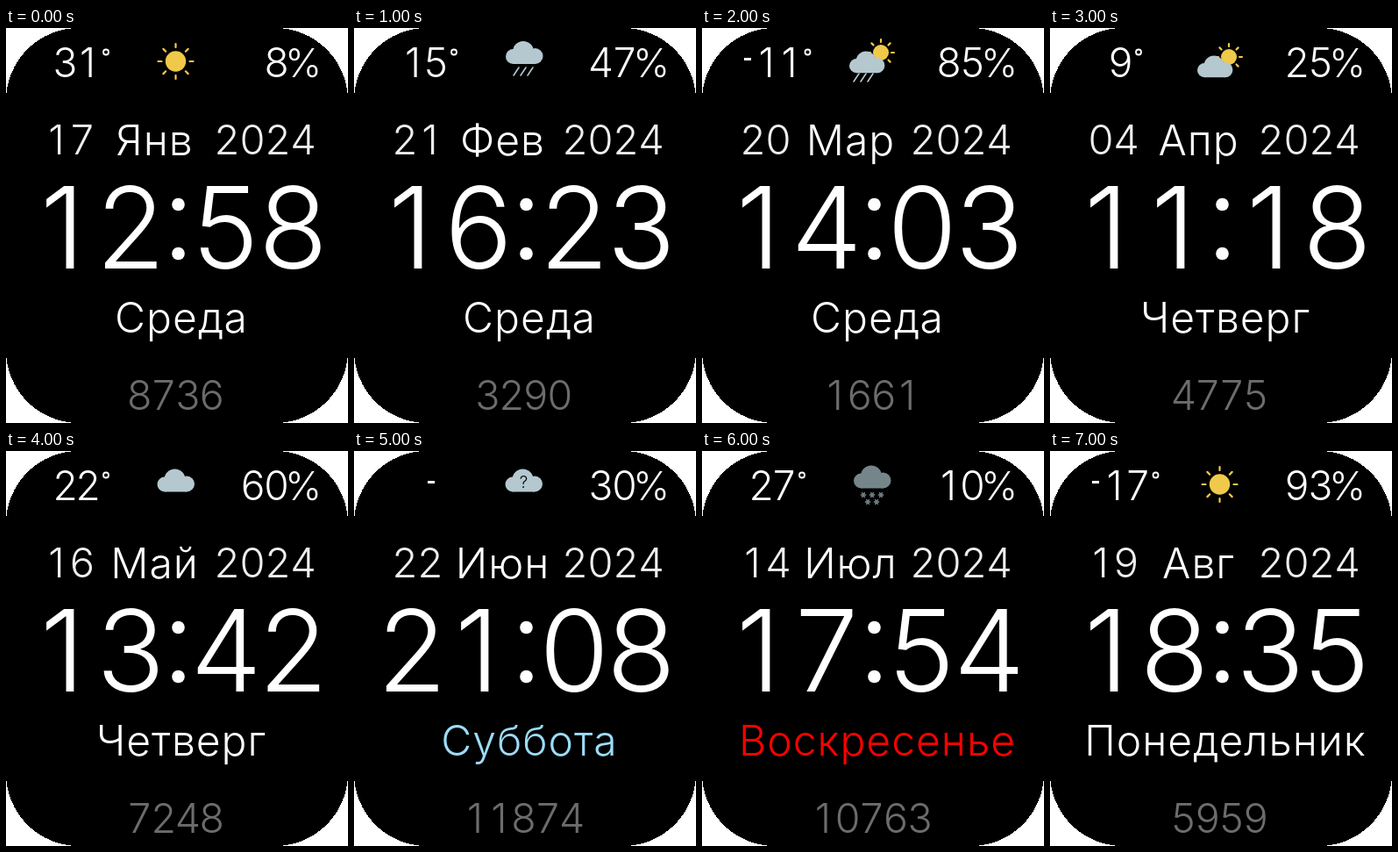
Recreate the animation shown at these times as an HTML page. Size 390x450 px, loop 8000 ms.

```html
<!DOCTYPE html>
<html lang="ru">
<meta charset="utf-8">
<title>Watch face</title>
<style>
  html, body { margin: 0; width: 100%; height: 100%; overflow: hidden; background: #fff }
  svg { display: block }
  text { font-family: Inter, "Liberation Sans", sans-serif; font-weight: 300; text-anchor: middle }
  .word { letter-spacing: 1px }
</style>
<svg width="390" height="450" viewBox="0 0 390 450">
  <rect width="390" height="450" rx="83" shape-rendering="crispEdges"/>
  <g id="face"></g>
</svg>
<script>
const SUN = '#f0c94a', LIGHT = '#b5c8cf', DARK = '#75868b', DATE = '#eee';

// temperature, icon, battery, day, month, time, weekday, steps
const states = [
  ['31', 'sun', 8, '17', 'Янв', '12:58', 'Среда', 8736],
  ['15', 'rain', 47, '21', 'Фев', '16:23', 'Среда', 3290],
  ['-11', 'sunRain', 85, '20', 'Мар', '14:03', 'Среда', 1661],
  ['9', 'sunCloud', 25, '04', 'Апр', '11:18', 'Четверг', 4775],
  ['22', 'cloud', 60, '16', 'Май', '13:42', 'Четверг', 7248],
  ['-', 'unknown', 30, '22', 'Июн', '21:08', 'Суббота', 11874],
  ['27', 'snow', 10, '14', 'Июл', '17:54', 'Воскресенье', 10763],
  ['-17', 'sun', 93, '19', 'Авг', '18:35', 'Понедельник', 5959]
];
const dayColors = { Суббота: '#9cdcf8', Воскресенье: '#f00' };

const text = (s, x, y, size, fill = '#fff', cls = '') =>
  `<text class="${cls}" x="${x}" y="${y}" font-size="${size}" fill="${fill}">${s}</text>`;
// Fixed-pitch digits; x is the centre of the first cell. The narrow 1 sits slightly left.
const digits = (s, x, y, size, pitch, fill) =>
  [...String(s)].map((c, i) => text(c, x + i * pitch - (c === '1') * size * .012, y, size, fill)).join('');
const circle = (x, y, r, fill) => `<circle cx="${x}" cy="${y}" r="${r}" fill="${fill}"/>`;
const stroke = (d, color, width) => `<path d="${d}" stroke="${color}" stroke-width="${width}" stroke-linecap="round" fill="none"/>`;

// Evenly spread radial strokes
function rays(x, y, count, inner, outer) {
  let d = '';
  for (let i = 0; i < count; i++) {
    const a = i * 2 * Math.PI / count, c = Math.cos(a), s = Math.sin(a);
    d += `M${x + c * inner} ${y + s * inner}L${x + c * outer} ${y + s * outer}`;
  }
  return d;
}
const sun = (x, y, r, inner, outer) =>
  circle(x, y, r, SUN) + stroke(rays(x, y, 8, inner, outer), SUN, 2.2);
const cloud = (x, y, fill, scale = 1) =>
  `<g transform="translate(${x} ${y}) scale(${scale})">` +
  circle(8.5, 17.5, 8.5, fill) + circle(20, 12, 12, fill) + circle(33.5, 17, 9, fill) +
  `<rect x="8.5" y="14" width="25" height="12" fill="${fill}"/></g>`;
const rain = (x, y) => stroke([0, 8, 16].map(i => `M${x + i + 6} ${y}l-6 9`).join(''), LIGHT, 1.6);
const sunCloud = y => sun(204, y + 16, 9, 12, 15) + cloud(168, y + 14.5, LIGHT, .95);
const flake = (x, y) => stroke(rays(x, y, 6, 1, 2.7), DARK, 1.5);

const icons = {
  sun: () => sun(193.5, 38, 11.7, 16, 20),
  rain: () => cloud(173, 15, LIGHT) + rain(182, 45),
  sunRain: () => sunCloud(12) + rain(173, 52),
  sunCloud: () => sunCloud(17),
  cloud: () => cloud(172.5, 20.5, LIGHT),
  unknown: () => cloud(172.5, 20.5, LIGHT) + text('?', 193.5, 42, 19, '#000'),
  snow: () => cloud(173, 16.5, DARK) +
    [184, 194, 204].map(x => flake(x, 50)).join('') + flake(189, 58) + flake(199, 58)
};

function temperature(value) {
  const minus = value[0] === '-', number = value.replace('-', '');
  const width = minus * 13 + number.length * 26 + 13;
  let x = 87 - width / 2, out = '';
  if (minus) {
    out += `<rect x="${number ? x : 84}" y="34" width="8" height="3" fill="#fff"/>`;
    x += 13;
  }
  if (!number) return out;
  return out + digits(number, x + 13, 55.5, 46, 26) +
    `<circle cx="${x + number.length * 26 + 7.5}" cy="27.5" r="3" fill="none" stroke="#fff" stroke-width="1.8"/>`;
}

function draw([temp, icon, battery, day, month, time, weekday, steps]) {
  const charge = String(battery), count = String(steps);
  return temperature(temp) + icons[icon]() +
    digits(charge, 308.5 - (charge.length - 1) * 27, 55.5, 46, 27) + text('%', 339, 55.5, 45) +
    digits(day, 58, 144, 47, 29, DATE) +
    text(month, 169.5, 145, 48, '#fff', 'word') +
    digits(2024, 252, 144, 47, 29, DATE) +
    digits(time.slice(0, 2), 66, 274, 129, 76) +
    circle(196.5, 201, 7.3, '#fff') + circle(196.5, 257, 7.3, '#fff') +
    digits(time.slice(3), 251, 274, 129, 76.5) +
    text(weekday, 200, 347, 48, dayColors[weekday] || '#fff', 'word') +
    digits(count, 193.5 - (count.length - 1) * 13.75, 435, 46.5, 27.5, '#6c6c6c');
}

const face = document.getElementById('face');
let shown = -1;
function tick() {
  const now = Math.floor(performance.now() % 8000 / 1000);
  if (now !== shown) face.innerHTML = draw(states[shown = now]);
  requestAnimationFrame(tick);
}
tick();
</script>
</html>
```
